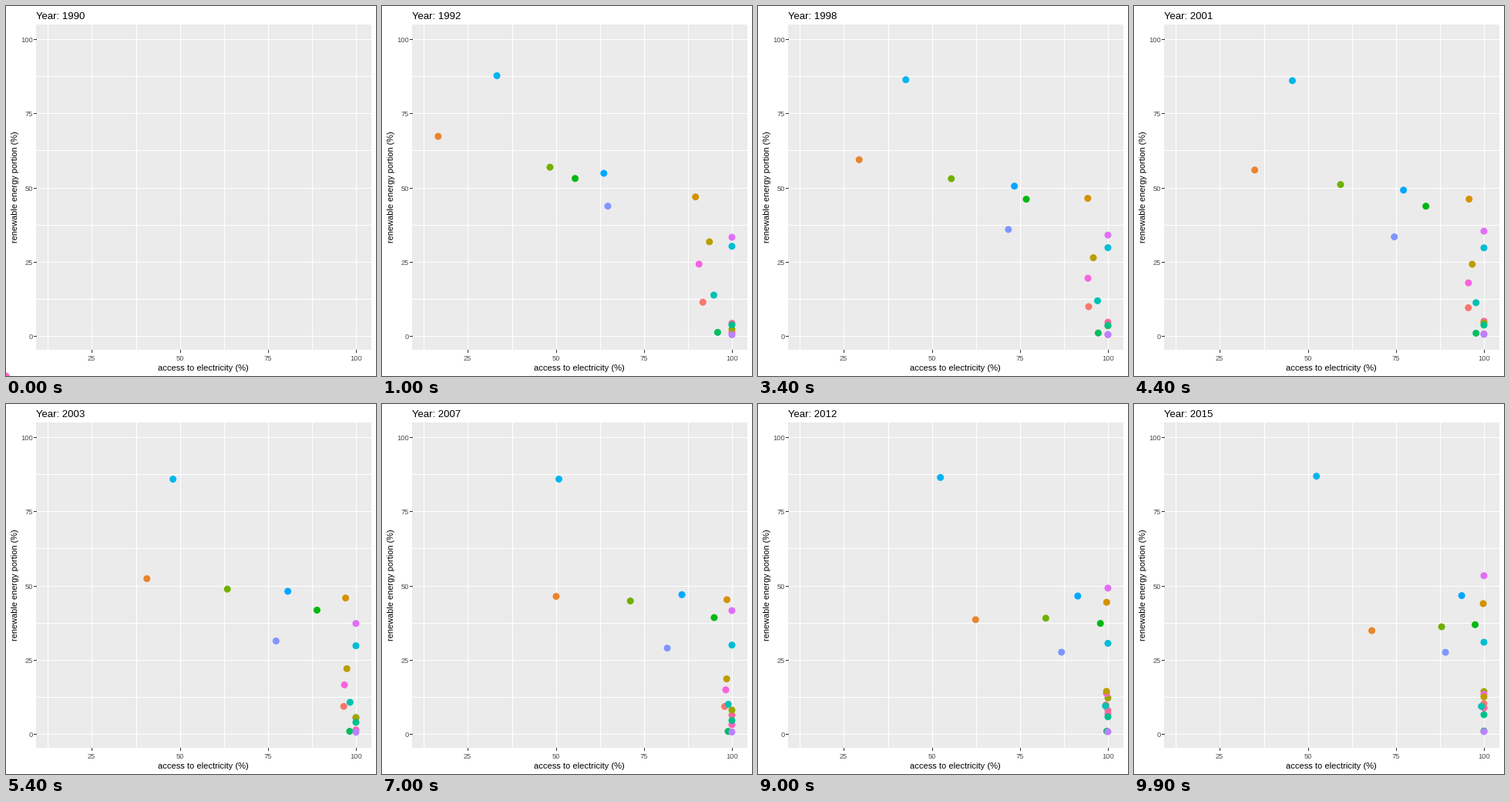
Animation of 480x480 px, one loop 10000 ms. Source, as a matplotlib script:

```python
import numpy as np
import matplotlib.pyplot as plt
from matplotlib.animation import FuncAnimation
from matplotlib.patches import Rectangle

FRAMES, STEP = 100, 100
START, END = 1990, 2015
KEYS = (START + 1, 2003.5, END)
PX = 0.75  # points per pixel at 96 dpi

plt.rcParams["font.family"] = "Liberation Sans"


def hue_color(i, n):
    """Evenly spaced hue at chroma 100 and luminance 65 (CIE LUV)."""
    h = np.radians(15 + 360 * i / n)
    lum, u, v = 65, 100 * np.cos(h), 100 * np.sin(h)
    y = ((lum + 16) / 116) ** 3
    u = u / (13 * lum) + 0.1978
    v = v / (13 * lum) + 0.4683
    x = 9 * y * u / (4 * v)
    z = -x / 3 - 5 * y + 3 * y / v
    rgb = np.array([3.240479 * x - 1.53715 * y - 0.498535 * z,
                    -0.969256 * x + 1.875992 * y + 0.041556 * z,
                    0.055648 * x - 0.204043 * y + 1.057311 * z])
    rgb = np.clip(rgb, 0, 1)
    return np.where(rgb > 0.00304, 1.055 * rgb ** (1 / 2.4) - 0.055, 12.92 * rgb)


def through(start, mid, end):
    """Percentage over time: a parabola through three key years."""
    a, b, c = KEYS
    s1 = (mid - start) / (b - a)
    bend = ((end - mid) / (c - b) - s1) / (c - a)

    def value(t):
        return np.clip(start + s1 * (t - a) + bend * (t - a) * (t - b), 0.3, 100)
    return value


tracks = []


def add(share, access=(100, 100, 100)):
    tracks.append((through(*access), through(*share)))


# One country per call, in hue order
add((11.8, 9.2, 10.1), (91, 96.5, 100))
add((69, 52.4, 34.7), (13.6, 40.4, 68.2))
add((46.8, 45.7, 43.8), (88.3, 97, 99.8))
add((33, 22, 12.4), (93, 97.4, 100))
add((2.1, 5.4, 14.2))
add((57.5, 48.8, 36), (47, 63.3, 88))
add((55, 41.7, 36.7), (49, 88.7, 97.5))
add((1.2, 0.8, 0.9), (95.6, 98.2, 100))
add((3.8, 3.8, 6.4))
add((14.2, 10.6, 9.2), (94.2, 98.3, 99.3))
add((30.3, 29.6, 30.8))
add((88, 85.7, 86.7), (30.5, 48, 52.5))
add((56, 48, 46.5), (61, 80.5, 93.7))
add((46, 31.3, 27.4), (63, 77.2, 89.1))
add((0.3, 0.5, 0.7))
add((33.5, 37, 53.2))
add((25.5, 16.5, 13.3), (89.6, 96.7, 100))
add((1.7, 1.2, 8.7))
add((4.2, 5.3, 8.7))

N = len(tracks)
colors = [hue_color(i, N) for i in range(N)]
behind = [17, 18, 4, 16]
order = behind + [i for i in range(N) if i not in behind]


def px_x(v):
    return 453.95 - (100 - v) * 4.574


def px_y(v):
    return 427.7 - v * 3.853


fig = plt.figure(figsize=(5, 5), dpi=96, facecolor="white")
ax = fig.add_axes([0, 0, 1, 1])
ax.set(xlim=(0, 480), ylim=(480, 0))
ax.axis("off")

L, T, R, B = 39, 24, 474, 446
ax.add_patch(Rectangle((L, T), R - L, B - T, fc="#EBEBEB", lw=0, zorder=0))


def line(x, y, color):
    ax.plot(x, y, color=color, lw=PX, solid_capstyle="butt",
            antialiased=False, zorder=1)


def label(x, y, s, size, color="black", **kw):
    return ax.text(x, y, s, fontsize=size * PX, color=color, **kw)


for v in np.arange(0, 101, 12.5):
    x, y = np.floor(px_x(v)) + 0.5, np.floor(px_y(v)) + 0.5
    major = v % 25 == 0
    line([L, R], [y, y], "white")
    if major:
        line([L - 3, L], [y, y], "#333333")
        label(34.8, y + 4.4, f"{v:.0f}", 9.3, "#4D4D4D", ha="right")
    if x > L:
        line([x, x], [T, B], "white")
        if major:
            line([x, x], [B, B + 3], "#333333")
            label(x + 0.3, 460, f"{v:.0f}", 9.3, "#4D4D4D", ha="center")

label(256, 473, "access to electricity (%)", 11.1, ha="center")
label(15.2, 235, "renewable energy portion (%)", 11, rotation=90,
      rotation_mode="anchor", ha="center", va="baseline")
title = label(39, 17, "", 13.2)
dots = ax.scatter([], [], s=(9 * PX) ** 2, lw=0, zorder=2,
                  facecolors=[])
dots.set_facecolors([colors[k] for k in order])


def draw(i):
    year = START + (END - START) * i / (FRAMES - 1)
    title.set_text(f"Year: {int(year)}")
    shown = order if year >= KEYS[0] else []
    spots = [(px_x(tracks[k][0](year)), px_y(tracks[k][1](year)))
             for k in shown]
    dots.set_offsets(np.reshape(spots, (-1, 2)))
    return title, dots


anim = FuncAnimation(fig, draw, frames=FRAMES, interval=STEP,
                     repeat=True, repeat_delay=0)
plt.show()
```
